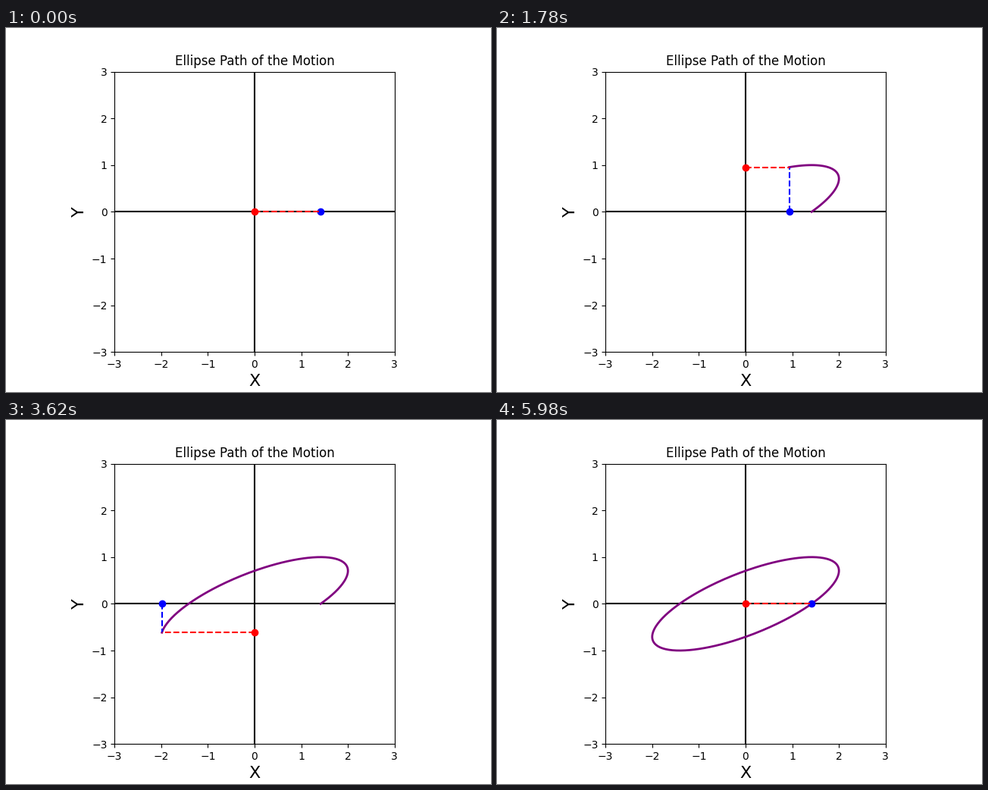
Animation of 640 by 480 pixels, one loop 6000 ms. Source, as a matplotlib script:

```python
import numpy as np
import matplotlib.pyplot as plt
from matplotlib.animation import FuncAnimation

FRAMES = 300
INTERVAL = 20

t = np.linspace(0, 2 * np.pi, FRAMES)
x = 2 * np.sin(t + np.pi / 4)
y = np.sin(t)

fig, ax = plt.subplots(figsize=(6.4, 4.8), dpi=100)
ax.set_aspect("equal")
ax.set(xlim=(-3, 3), ylim=(-3, 3))
ax.set_xticks(range(-3, 4))
ax.set_yticks(range(-3, 4))
ax.set_title("Ellipse Path of the Motion")
ax.set_xlabel("X", fontsize=16)
ax.set_ylabel("Y", fontsize=16)
ax.axhline(0, color="black")
ax.axvline(0, color="black")

trail, = ax.plot([], [], color="purple", lw=2)
x_dot, = ax.plot([], [], "o", color="blue")
y_dot, = ax.plot([], [], "o", color="red")
x_guide, = ax.plot([], [], "--", color="blue")
y_guide, = ax.plot([], [], "--", color="red")


def update(i):
    px, py = x[i], y[i]
    trail.set_data(x[:i + 1], y[:i + 1])
    x_dot.set_data([px], [0])
    y_dot.set_data([0], [py])
    x_guide.set_data([px, px], [0, py])
    y_guide.set_data([0, px], [py, py])
    return trail, x_dot, y_dot, x_guide, y_guide


anim = FuncAnimation(fig, update, frames=FRAMES, interval=INTERVAL,
                     init_func=lambda: update(0), blit=True,
                     repeat=True, repeat_delay=0)
plt.show()
```
